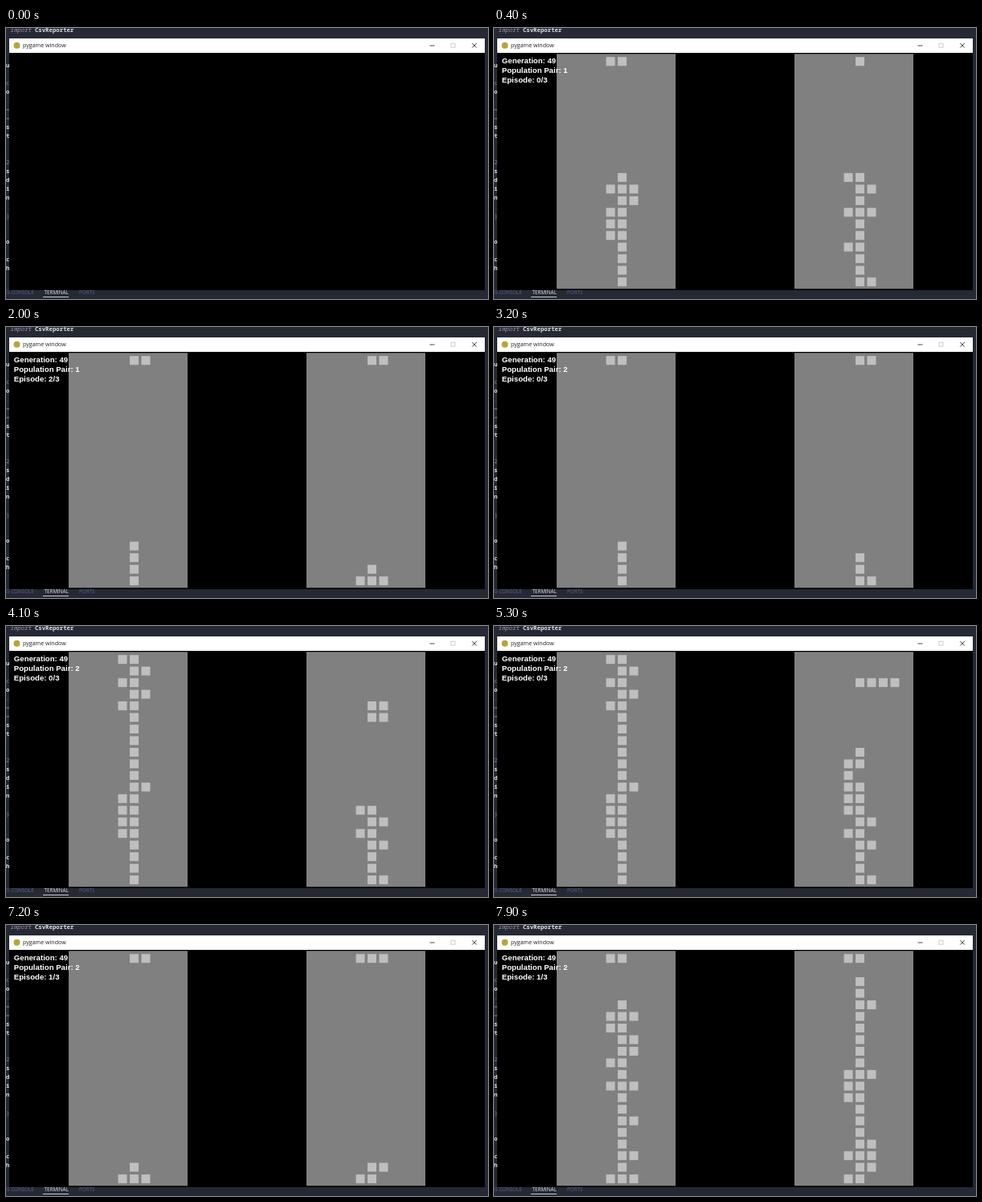
Recreate the animation shown at these times as an HTML page with a canvas. Size 600x338 px, loop 8 s.

```html
<!DOCTYPE html>
<html lang="en">
<head>
<meta charset="utf-8">
<title>pygame window</title>
<style>
  html, body { margin: 0; width: 100%; height: 100%; overflow: hidden; background: #252933; }
  canvas { display: block; width: 600px; height: 338px; }
</style>
</head>
<body>
<canvas id="stage" width="600" height="338"></canvas>
<script>
const LOOP = 8000, ROWS = 20, PITCH = 14.47, CELL = 11;
const ctx = document.getElementById('stage').getContext('2d');

// Columns filled in each row of a piece, bottom row first
const SHAPES = {
  I: ['5', '5', '5', '5'], O: ['45', '45'], S: ['45', '56'], Z: ['56', '45'],
  L: ['56', '5', '5'], J: ['45', '5', '5'], T: ['456', '5'], K: ['456', '6'],
  V: ['4', '45', '5'], H: ['2345']
};

// drops: tenths of a second at which the next piece lands; the piece after it waits in the top row
const EPISODES = [
  { pair: 1, ep: 0, drops: [1, 1, 2, 4, 5, 6, 7, 8, 10], left: 'IOSTSZOTS', right: 'LJTZIOJS' },
  { pair: 1, ep: 1, drops: [11, 12, 13, 14, 15, 16, 17, 18], left: 'OJJSTLOSS', right: 'IIIZZTS' },
  { pair: 1, ep: 2, drops: [20, 21, 22, 24, 25, 26, 27, 28, 30], left: 'IZLTSOJS', right: 'TLZOSTZSI' },
  { pair: 2, ep: 0, drops: [32, 34, 35, 36, 38, 39, 40], left: 'IOOLISSS', right: 'LZZOVHZ',
    rightDrops: [32, 34, 35, 49, 51, 59, 66],
    falling: [
      '35 O 1 0', '36 O 1 1', '38 O 1 2', '39 O 1 3', '40 O 1 4', '41 O 1 5', '42 O 0 6',
      '44 O 0 8', '46 O 1 9', '48 O 0 10', '49 V 0 0', '50 V 0 4', '51 I 0 0',
      '53 H 3 2', '54 H 2 3', '55 H 1 4', '56 H 0 5', '58 H 0 6',
      '59 Z 0 0', '60 Z 0 1', '61 Z 0 2', '63 Z 0 3', '64 Z 0 4', '65 Z 0 5',
      '66 T 0 0', '68 T 0 1', '69 T -1 3'
    ] },
  { pair: 2, ep: 1, drops: [72, 73, 74, 75, 76, 78, 79], left: 'TLLTSZTS', right: 'SKIOTILS' }
];

function cells(shape, dx, row) {
  return SHAPES[shape].flatMap((cols, i) => [...cols].map(c => [+c + dx, row - i]));
}

function stack(pieces) {
  const filled = new Set();
  const free = ([c, r]) => r < ROWS && !filled.has(c + ',' + r);
  const placed = [];
  for (const p of pieces) {
    let row = -1;
    while (cells(p, 0, row + 1).every(free)) row++;
    for (const cell of cells(p, 0, row)) {
      filled.add(cell.join());
      placed.push(cell);
    }
  }
  return placed;
}

function rect(color, x, y, w, h) {
  ctx.fillStyle = color;
  ctx.fillRect(x, y, w, h);
}

function text(str, x, y, font, color) {
  ctx.font = font;
  ctx.fillStyle = color;
  ctx.fillText(str, x, y);
}

function line(color, ...pts) {
  ctx.strokeStyle = color;
  ctx.lineWidth = 0.9;
  ctx.beginPath();
  for (let i = 0; i < pts.length; i += 4) {
    ctx.moveTo(pts[i], pts[i + 1]);
    ctx.lineTo(pts[i + 2], pts[i + 3]);
  }
  ctx.stroke();
}

function drawEditor() {
  const mono = '7.35px "Noto Sans Mono", "DejaVu Sans Mono", monospace';
  const sans = '6.3px "Open Sans", sans-serif';
  rect('#252933', 0, 0, 600, 338);
  text('import', 5, 5, 'italic ' + mono, '#a08fae');
  text('CsvReporter', 35.9, 5, 'bold ' + mono, '#dfe3ea');
  const edge = { 49: 'u', 71: 'c', 82: 'o', 93: '.', 104: '=', 115: '=', 126: 's', 137: 't', 170: '2',
    181: 's', 192: 'd', 203: 'i', 214: 'n', 237: ')', 269: 'o', 291: 'c', 302: 'h' };
  for (const y in edge) {
    const dim = 'c.=2)'.includes(edge[y]) && y < 250;
    text(edge[y], 0, +y, dim ? mono : 'bold ' + mono, dim ? '#7d828c' : '#d5d9e0');
  }
  text('G CONSOLE', 0, 332.3, sans, '#5b6290');
  text('TERMINAL', 47.5, 332.3, sans, '#e0e3ea');
  text('PORTS', 91, 332.3, sans, '#5b6290');
  rect('#c5c9d2', 46, 335, 32, 1);
}

function drawWindow() {
  rect('#fff', 4, 13, 592, 18);
  rect('#000', 4, 31, 592, 296);
  ctx.fillStyle = '#b5a63c';
  ctx.beginPath();
  ctx.arc(13.5, 21.7, 4, 0, 7);
  ctx.fill();
  text('pygame window', 21, 24.3, '7.1px "Open Sans", sans-serif', '#222');
  line('#333', 527.5, 22, 533.5, 22);
  ctx.strokeStyle = '#c8c8c8';
  ctx.strokeRect(554, 19.2, 5, 5);
  line('#222', 580.3, 19, 585.8, 24.5, 585.8, 19, 580.3, 24.5);
}

function drawBoard(x, list) {
  rect('#808080', x, 32.3, 148, 293);
  for (const [c, r] of list)
    if (r >= 0) rect('#bfbfbf', x + 3.7 + c * PITCH, 36.2 + r * PITCH, CELL, CELL);
}

function boardCells(pieces, drops, tick, falling) {
  const n = drops.filter(d => d <= tick).length;
  const list = stack(pieces.slice(0, n));
  if (falling) {
    const now = falling.map(f => f.split(' ')).filter(f => +f[0] <= tick).pop();
    if (now) return list.concat(cells(now[1], +now[2], +now[3]));
  }
  return pieces[n] ? list.concat(cells(pieces[n], 0, 0)) : list;
}

function drawGame(tick) {
  const e = EPISODES.filter(s => s.drops[0] <= tick).pop();
  if (!e) return;
  drawBoard(78, boardCells(e.left, e.drops, tick));
  drawBoard(374, boardCells(e.right, e.rightDrops || e.drops, tick, e.falling));
  const font = 'bold 9.65px "Liberation Sans", Arial, sans-serif';
  ['Generation: 49', `Population Pair: ${e.pair}`, `Episode: ${e.ep}/3`]
    .forEach((s, i) => text(s, 9.8, 44.4 + i * 11.55, font, '#fff'));
}

let start = null, last = -1;
function frame(now) {
  if (start === null) start = now;
  const tick = Math.floor(((now - start) % LOOP) / 100);
  if (tick !== last) {
    last = tick;
    drawEditor();
    drawWindow();
    drawGame(tick);
  }
  requestAnimationFrame(frame);
}
requestAnimationFrame(frame);
</script>
</body>
</html>
```
